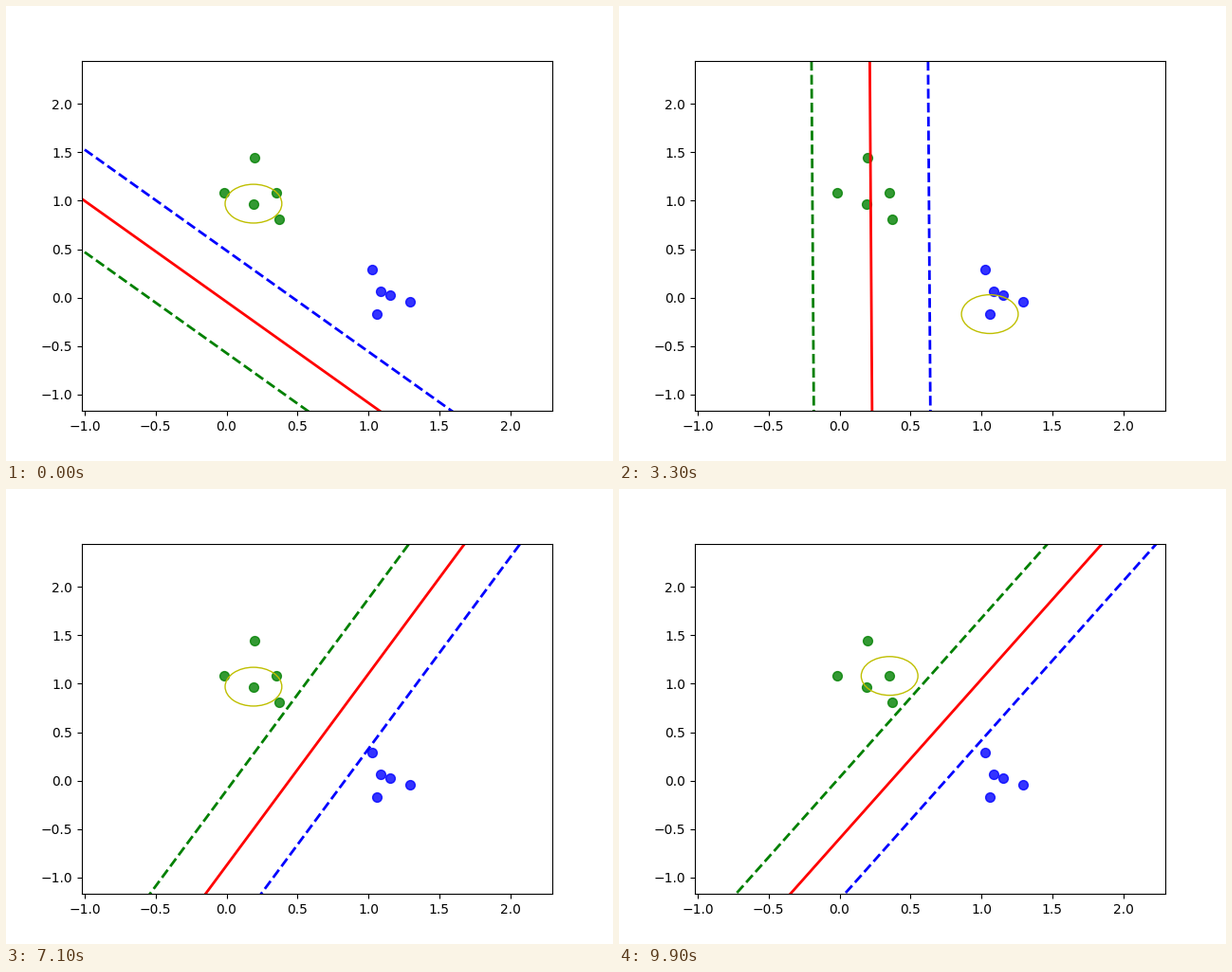
Recreate the animation shown at these times as a matplotlib script. Size 640 px wide and 480 px high, loop 10 s.

```python
import numpy as np
import matplotlib.pyplot as plt
from matplotlib.animation import FuncAnimation

FRAMES = 100

points = np.array([(0.190, 0.970), (0.195, 1.4475), (1.088, 0.069),
                   (-0.0201, 1.081), (0.373, 0.805), (1.2975, -0.040),
                   (1.060, -0.1705), (0.353, 1.081), (1.152, 0.026),
                   (1.028, 0.291)])
is_blue = points[:, 0] > points[:, 1]

# Key moments of the training run; the weights drift evenly between them
key_steps = [0, 14, 33, 48, 61, 81, 99]
key_wx = [1.970, 1.977, 2.433, 2.642, 2.603, 2.499, 2.607]
key_wy = [1.890, 1.024, 0.011, -0.825, -1.211, -1.368, -1.585]
key_bias = [0.083, -0.338, -0.546, -0.954, -1.225, -1.036, -0.950]


def weights(step):
    return [np.interp(step, key_steps, k) for k in (key_wx, key_wy, key_bias)]


def visited(step):
    """Scrambled but repeatable choice of the sample to train on."""
    return points[8 * step % 31 % len(points)]


fig, ax = plt.subplots(figsize=(6.4, 4.8), dpi=100)
low, high = points.min(axis=0) - 1, points.max(axis=0) + 1
ax.set_xlim(low[0], high[0])
ax.set_ylim(low[1], high[1])

for mask, color in ((~is_blue, "g"), (is_blue, "b")):
    ax.scatter(*points[mask].T, s=50, color=color, alpha=0.8)
ring = ax.add_patch(plt.Circle(visited(0), 0.2, color="y", fill=False))

# Decision boundary and both margins: w.x + b = level
xs = np.array([-10.0, 10.0])
levels = {0: "r-", 1: "b--", -1: "g--"}
lines = {level: ax.plot([], [], style, lw=2, scalex=False, scaley=False)[0]
         for level, style in levels.items()}


def update(step):
    wx, wy, bias = weights(step)
    for level, line in lines.items():
        line.set_data(xs, (level - bias - wx * xs) / wy)
    ring.set_center(visited(step))
    return [*lines.values(), ring]


anim = FuncAnimation(fig, update, frames=FRAMES, interval=100, repeat=True)
plt.show()
```
